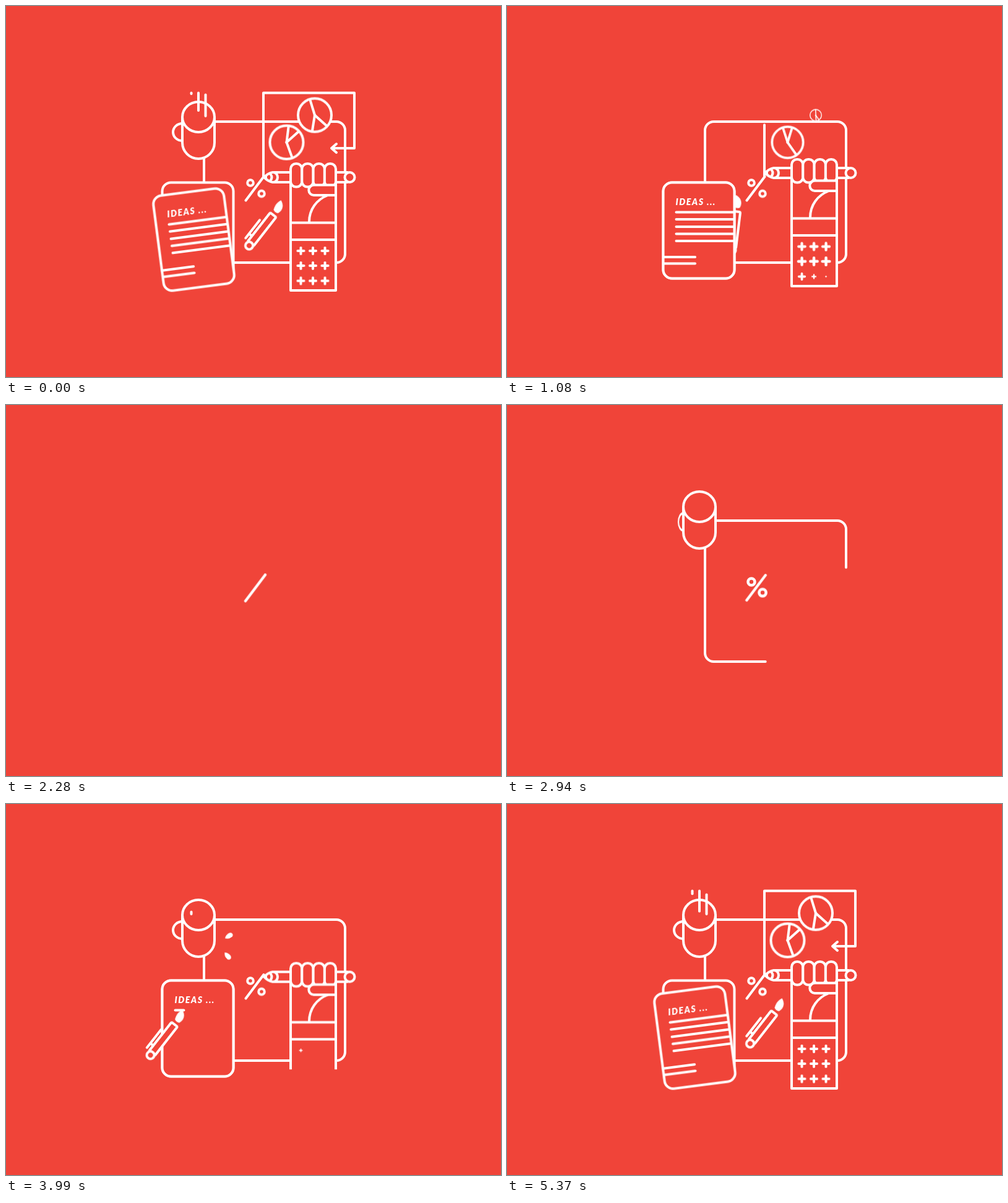
Animation, 800 px wide and 600 px high, one loop 5.4 s. Source, as an HTML page:

```html
<!DOCTYPE html>
<html lang="en">
<head>
<meta charset="utf-8">
<title>Ideas</title>
<style>
html, body { margin: 0; width: 100%; height: 100%; overflow: hidden; background: #f04439; }
svg { display: block; width: 800px; height: 600px; fill: none; stroke: #fff; stroke-width: 4; stroke-linecap: round; stroke-linejoin: round; }
svg * { animation: 5.4s cubic-bezier(.45, 0, .55, 1) infinite; }
.solid { fill: #f04439; }
.white { fill: #fff; stroke: none; }
.dash { stroke-dasharray: 1 3; }
text { font: italic 900 14.2px Lato, sans-serif; letter-spacing: 1.5px; fill: #fff; stroke: none; }

/* 1% of the loop is 54 ms */
.board { animation-name: board; }
@keyframes board {
  0%, 26.7% { stroke-dashoffset: 0; }
  36.7% { stroke-dashoffset: -1.02; }
  36.71%, 48.9% { stroke-dashoffset: 1.02; }
  58%, 100% { stroke-dashoffset: 0; }
}
.arrow { animation-name: arrow; }
@keyframes arrow {
  0%, 8.9% { stroke-dashoffset: 0; animation-timing-function: cubic-bezier(.11, 0, .5, 0); }
  21.5%, 74.3% { stroke-dashoffset: 1.02; }
  85.6%, 100% { stroke-dashoffset: 0; }
}
.head { animation-name: head; }
@keyframes head {
  0%, 6.5% { stroke-dashoffset: 0; }
  9%, 85% { stroke-dashoffset: 1.02; }
  88%, 100% { stroke-dashoffset: 0; }
}
.slash { animation-name: slash; transform-origin: 402px 295px; }
@keyframes slash {
  0%, 33% { transform: translate(0, 0) scale(1); }
  40%, 43.5% { transform: translate(1px, .5px) scale(1.1); }
  66%, 100% { transform: translate(0, 0) scale(1); }
}
.ring { animation-name: ring; animation-delay: calc(var(--i) * 60ms - 5400ms); }
@keyframes ring {
  0%, 33% { transform: scale(1); }
  35% { transform: scale(1.15); }
  38.5%, 43.5% { transform: scale(0); }
  47.5% { transform: scale(1.2); }
  66%, 100% { transform: scale(1); }
}
.pie { animation-name: pie; animation-delay: calc(var(--i) * 100ms - 5400ms); }
@keyframes pie {
  0%, 16.7% { transform: scale(1); }
  17.8% { transform: scale(1.05); animation-timing-function: linear; }
  21.1%, 79% { transform: scale(0); }
  84.5% { transform: scale(1.08); }
  91%, 100% { transform: scale(1); }
}
.spoke { animation-name: spoke; }
@keyframes spoke {
  0%, 8% { transform: rotate(var(--a)); }
  20%, 75% { transform: rotate(var(--b)); }
  89.4% { transform: rotate(var(--c)); }
  99%, 100% { transform: rotate(var(--a)); }
}
.cup { animation-name: cup; transform-origin: 311px 174px; }
@keyframes cup {
  0%, 11.1% { transform: translateY(0) scale(1); }
  14.8% { transform: translateY(-21px) scale(1); }
  20.2%, 49.1% { transform: translateY(-21px) scale(0); }
  52.8% { transform: translateY(-21px) scale(1); }
  57.4% { transform: translateY(2px) scale(1); }
  62.2% { transform: translateY(-1.5px) scale(1); }
  65%, 100% { transform: translateY(0) scale(1); }
}
.handle { animation-name: handle; transform-origin: 285px 204px; }
@keyframes handle {
  0%, 10.8% { transform: scaleX(1); }
  14%, 52.8% { transform: scaleX(0); }
  56%, 100% { transform: scaleX(1); }
}
.steam { animation-name: steam; animation-delay: calc(var(--i) * 150ms - 2340ms); }
@keyframes steam {
  0%, 11.101%, 15.93%, 27.041%, 33.24%, 44.361%, 100% { stroke-dashoffset: 1.02; }
  5.37%, 21.3%, 38.6% { stroke-dashoffset: 0; }
  11.1%, 27.04%, 44.36% { stroke-dashoffset: -1.02; }
}
.drop { animation-name: drop; animation-timing-function: ease-out; }
@keyframes drop {
  0%, 59.5% { transform: translateX(0) scale(0); }
  62.2% { transform: translateX(8px) scale(1.05); }
  73.9% { transform: translateX(21px) scale(.7); }
  77%, 100% { transform: translateX(25px) scale(0); }
}
.spark { animation-name: spark; animation-timing-function: ease-out; }
@keyframes spark {
  0%, 35.2%, 57%, 100% { transform: translateX(0) scale(0); }
  37.5%, 59% { transform: translateX(6px) scale(.9); }
  40.5%, 61.8% { transform: translateX(22px) scale(0); }
}
.paper { animation-name: paper; transform-origin: 310px 363px; }
@keyframes paper {
  0%, 22% { transform: scale(1); }
  24.5% { transform: scale(1.06); }
  28.5%, 61% { transform: scale(0); }
  62.2% { transform: scale(.14); }
  66.5% { transform: scale(1.07); }
  69.5%, 100% { transform: scale(1); }
}
.tilt { animation-name: tilt; transform-origin: 310px 363px; }
@keyframes tilt {
  0%, 9.3% { transform: translate(-6.5px, 14.8px) rotate(-7.4deg); }
  11.5% { transform: translate(-7px, 16.5px) rotate(-7.8deg); }
  16.7% { transform: translate(0, 0) rotate(.6deg); }
  20%, 93.3% { transform: translate(0, 0) rotate(0deg); }
  98% { transform: translate(-7px, 16.5px) rotate(-7.8deg); }
  99.4%, 100% { transform: translate(-6.5px, 14.8px) rotate(-7.4deg); }
}
.first { animation-name: first; animation-timing-function: linear; }
@keyframes first {
  0%, 40% { stroke-dashoffset: 0; }
  40.01%, 71.67% { stroke-dashoffset: 1.02; }
  85.2%, 100% { stroke-dashoffset: 0; }
}
.row { animation-name: row; animation-delay: calc(var(--i) * 80ms - 5400ms); }
@keyframes row {
  0%, 40% { stroke-dashoffset: 0; }
  40.01%, 87.4% { stroke-dashoffset: 1.02; }
  93%, 100% { stroke-dashoffset: 0; }
}
.tuck { animation-name: tuck; }
@keyframes tuck {
  0%, 13% { transform: translate(393px, 387.5px) rotate(38deg); visibility: visible; }
  20% { transform: translate(363.5px, 395px) rotate(7deg); }
  22.5%, 26% { transform: translate(335px, 397px) rotate(0deg); visibility: visible; }
  26.1%, 100% { transform: translate(335px, 397px) rotate(0deg); visibility: hidden; }
}
.pen { animation-name: pen; }
@keyframes pen {
  0%, 59.9% { transform: translate(214px, 398px) rotate(38deg) scale(0); visibility: hidden; }
  60% { transform: translate(214px, 398px) rotate(38deg) scale(0); visibility: visible; }
  61.7%, 68.5% { transform: translate(214px, 398px) rotate(38deg) scale(1); }
  71.67% { transform: translate(218px, 406px) rotate(38deg) scale(1); animation-timing-function: linear; }
  85.2% { transform: translate(312px, 407px) rotate(38deg) scale(1); animation-timing-function: linear; }
  89.4% { transform: translate(353px, 411px) rotate(38deg) scale(1); animation-timing-function: ease-out; }
  95%, 100% { transform: translate(393px, 387.5px) rotate(38deg) scale(1); visibility: visible; }
}
.barrel { animation-name: barrel; }
@keyframes barrel {
  0%, 62.2% { transform: scale(.5, .08); }
  67%, 100% { transform: scale(1, 1); }
}
.hand { animation-name: hand; transform-origin: 497px 280px; }
@keyframes hand {
  0%, 13% { transform: translateY(0) scale(1); }
  15.7% { transform: translateY(2px) scale(1); }
  20% { transform: translateY(-7px) scale(1); }
  23% { transform: translateY(-8px) scale(1); }
  26% { transform: translateY(-6px) scale(1.12); }
  29.6%, 64% { transform: translateY(0) scale(0); }
  69% { transform: translateY(-2px) scale(1.01); }
  73.9% { transform: translateY(2.5px) scale(1); }
  78%, 100% { transform: translateY(0) scale(1); }
}
.reveal { animation-name: reveal; transform-origin: 0 270px; }
@keyframes reveal {
  0%, 20.2% { transform: scaleY(1); }
  25.9%, 67% { transform: scaleY(.1); animation-timing-function: linear; }
  73.9% { transform: scaleY(.78); }
  76%, 100% { transform: scaleY(1); }
}
.plus { animation-name: plusIn, plusOut; animation-timing-function: linear;
  animation-delay: calc(var(--i) * 45ms - 5400ms), calc((8 - var(--i)) * 40ms - 5400ms); }
@keyframes plusIn {
  0%, 40% { scale: 1; }
  40.01%, 73% { scale: 0; }
  75.5% { scale: 1.15; }
  77.5%, 100% { scale: 1; }
}
@keyframes plusOut {
  0%, 12% { transform: scale(1); }
  18.1% { transform: scale(1.15); }
  20.5%, 40% { transform: scale(0); }
  40.01%, 100% { transform: scale(1); }
}
</style>
</head>
<body>
<svg width="800" height="600">
  <defs>
    <path id="drop" class="white" d="M0 0C6 -7 20 -8 20 0S6 7 0 0Z"/>
    <path id="plus" d="M-5 0H5M0 -5V5"/>
    <g id="barrel">
      <path class="solid" d="M-6 -5V-61Q-6 -63 -4 -63H4Q6 -63 6 -61V-5Z"/>
      <path d="M-12 -6V-43M-12 -15H-6"/>
      <path class="white" d="M-4.500 -70C-8 -78 -7 -84 -4.500 -89.500C4 -86 8 -79 4.500 -70Q0 -67.500 -4.500 -70Z"/>
    </g>
    <circle id="cap" class="solid" r="6"/>
    <clipPath id="sleeve"><rect class="reveal" x="450" y="270" width="95" height="200"/></clipPath>
  </defs>

  <path class="dash board" pathLength="1" d="M320 201a14 14 0 0 1 14-14H534a14 14 0 0 1 14 14V401"/>
  <path class="dash board" pathLength="1" d="M320 201V401a14 14 0 0 0 14 14H534a14 14 0 0 0 14-14"/>
  <g transform="translate(548 415) rotate(10)"><use href="#drop" class="spark"/></g>
  <g transform="translate(548 415) rotate(80)"><use href="#drop" class="spark"/></g>

  <path class="dash arrow" pathLength="1" d="M416 276V140.500H563V230H527"/>
  <path class="dash head" pathLength="1" d="M534 223L526 230L534 237"/>

  <path class="slash" d="M416.500 276L387.500 314.500"/>
  <g transform="translate(395 286)"><circle class="ring" style="--i:0" r="4.800"/></g>
  <g transform="translate(413 303.500)"><circle class="ring" style="--i:1" r="4.800"/></g>

  <g transform="translate(499 176.500)"><g class="pie" style="--i:0">
    <circle class="solid" r="27"/>
    <path class="spoke" style="--a:-107deg;--b:-92deg;--c:-89deg" d="M0 0H26"/>
    <path class="spoke" style="--a:42deg;--b:55deg;--c:36deg" d="M0 0H26"/>
    <path class="spoke" style="--a:99deg;--b:85deg;--c:90deg" d="M0 0H26"/>
  </g></g>
  <g transform="translate(453.500 220.500)"><g class="pie" style="--i:1">
    <circle class="solid" r="27"/>
    <path class="spoke" style="--a:-83deg;--b:-108deg;--c:-97deg" d="M0 0H26"/>
    <path class="spoke" style="--a:-42deg;--b:-73deg;--c:-47deg" d="M0 0H26"/>
    <path class="spoke" style="--a:70deg;--b:55deg;--c:58deg" d="M0 0H26"/>
  </g></g>

  <g class="tuck"><use href="#barrel"/><use href="#cap"/></g>

  <g class="paper">
    <rect class="solid" x="252.500" y="285.500" width="115" height="155" rx="14"/>
    <g class="tilt">
      <rect class="solid" x="252.500" y="285.500" width="115" height="155" rx="14"/>
      <text x="272.500" y="322">IDEAS ...</text>
      <path class="dash first" pathLength="1" d="M273.500 333.500H367"/>
      <path class="dash row" style="--i:0" pathLength="1" d="M273.500 345H367"/>
      <path class="dash row" style="--i:1" pathLength="1" d="M273.500 357H367"/>
      <path class="dash row" style="--i:2" pathLength="1" d="M273.500 368.500H367"/>
      <path class="dash row" style="--i:3" pathLength="1" d="M273.500 380H367"/>
      <path class="dash row" style="--i:2.500" pathLength="1" d="M253 406H304"/>
      <path class="dash row" style="--i:3.500" pathLength="1" d="M253 416.500H304"/>
    </g>
  </g>

  <g class="cup">
    <path class="handle" d="M285 190a15 14 0 0 0 0 28"/>
    <path class="solid" d="M285 180V221A26 26 0 0 0 337 221V180"/>
    <ellipse class="solid" cx="311" cy="179.500" rx="26" ry="24.500"/>
  </g>
  <g transform="translate(336 228) rotate(-31)"><use href="#drop" class="drop"/></g>
  <g transform="translate(340 224) rotate(50)"><use href="#drop" class="drop"/></g>
  <path class="dash steam" style="--i:0" pathLength="1" d="M299.500 178V140.500"/>
  <path class="dash steam" style="--i:1" pathLength="1" d="M311 178V140.500"/>
  <path class="dash steam" style="--i:2" pathLength="1" d="M322.500 178V142"/>

  <g class="hand">
    <g clip-path="url(#sleeve)">
      <rect class="solid" x="460" y="280" width="73" height="180"/>
      <path d="M460 350.500H533M460 378H533M490 349C490 329 502 313 520 306"/>
      <g transform="translate(476.500 396)"><use href="#plus" class="plus" style="--i:0"/></g>
      <g transform="translate(496 396)"><use href="#plus" class="plus" style="--i:1"/></g>
      <g transform="translate(515.500 396)"><use href="#plus" class="plus" style="--i:2"/></g>
      <g transform="translate(476.500 420)"><use href="#plus" class="plus" style="--i:3"/></g>
      <g transform="translate(496 420)"><use href="#plus" class="plus" style="--i:4"/></g>
      <g transform="translate(515.500 420)"><use href="#plus" class="plus" style="--i:5"/></g>
      <g transform="translate(476.500 444.500)"><use href="#plus" class="plus" style="--i:6"/></g>
      <g transform="translate(496 444.500)"><use href="#plus" class="plus" style="--i:7"/></g>
      <g transform="translate(515.500 444.500)"><use href="#plus" class="plus" style="--i:8"/></g>
    </g>
    <path class="solid" d="M552 269H431Q424 270 417 277Q424 284 431 285H552"/>
    <path d="M427 271.500q5 5.500 0 11M432 269a7 8 0 0 1 0 16"/>
    <path class="white" d="M416 277L422 272.500V281.500Z"/>
    <circle class="solid" cx="555.500" cy="277" r="8"/>
    <rect class="solid" x="460" y="255" width="18.300" height="37.500" rx="8.500"/>
    <rect class="solid" x="478.300" y="255" width="18.300" height="37.500" rx="8.500"/>
    <rect class="solid" x="496.600" y="255" width="18.300" height="37.500" rx="8.500"/>
    <rect class="solid" x="514.900" y="255" width="18.100" height="37.500" rx="8.500"/>
    <path class="solid" d="M533 270V306H497.500a8.200 8.200 0 0 1 0-16.400H533"/>
  </g>

  <g class="pen"><g class="barrel"><use href="#barrel"/></g><use href="#cap"/></g>
</svg>
</body>
</html>
```
